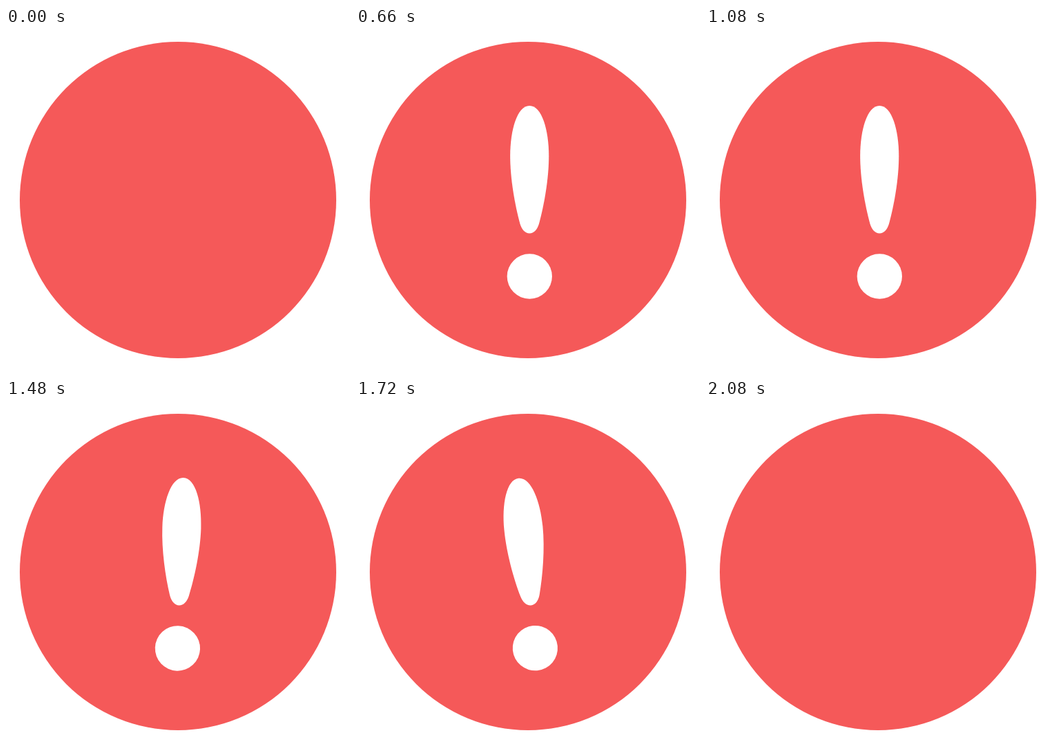
An HTML page that plays this animation: 500x500 px, repeating every 2.1 s.

```html
<!DOCTYPE html>
<html lang="en">
<head>
<meta charset="utf-8">
<title>Alert</title>
<style>
  html, body { margin: 0; width: 100%; height: 100%; overflow: hidden; background: #fff; }
  svg { display: block; width: 100%; height: 100%; }
</style>
</head>
<body>
<svg viewBox="0 0 500 500">
  <circle cx="250" cy="250" r="230" fill="#f55959"/>
  <g id="sign" fill="#fff">
    <path id="bar" d="M252.2 113
      C270 113 280.3 148 280.3 186
      C280.3 219 273.5 257 266 284.5
      C263.5 293 258.5 298.5 252.2 298.5
      C245.9 298.5 240.9 293 238.4 284.5
      C230.9 257 224.1 219 224.1 186
      C224.1 148 234.4 113 252.2 113Z"/>
    <circle id="dot" cx="252.3" cy="361" r="32.7"/>
  </g>
</svg>
<script>
  const LOOP = 2100, STEP = 20;
  const sign = document.getElementById('sign');
  const bar = document.getElementById('bar');
  const dot = document.getElementById('dot');

  // [time in ms, value]
  const stretch = [[224, 0], [420, 1.092], [660, 1], [1920, 1], [2080, 0]];
  const shake = [786, 1466].flatMap(start =>
    [0, 8.3, -8.3, 8.3, -8.3, 0].map((angle, i) => [start + i * 58.6, angle]));

  const linear = p => p;
  const smooth = p => (1 - Math.cos(Math.PI * p)) / 2;

  function valueAt(keys, t, ease) {
    if (t <= keys[0][0]) return keys[0][1];
    const i = keys.findIndex(key => t < key[0]);
    if (i < 0) return keys[keys.length - 1][1];
    const [t0, a] = keys[i - 1], [t1, b] = keys[i];
    return a + (b - a) * ease((t - t0) / (t1 - t0));
  }

  function scaleY(part, s, pivot) {
    part.setAttribute('transform', `translate(0 ${pivot * (1 - s)}) scale(1 ${s})`);
  }

  function draw(t) {
    const s = valueAt(stretch, t, smooth);
    sign.setAttribute('visibility', s > 0 ? 'visible' : 'hidden');
    sign.setAttribute('transform', `rotate(${valueAt(shake, t, linear)} 252.2 277)`);
    scaleY(bar, s, 298.5);
    // The dot overshoots less than the bar.
    scaleY(dot, s > 1 ? 1 + (s - 1) * 0.64 : s, 302);
  }

  const begin = performance.now();
  function tick() {
    const t = (performance.now() - begin) % LOOP;
    draw(Math.floor(t / STEP) * STEP);
    requestAnimationFrame(tick);
  }
  tick();
</script>
</body>
</html>
```
